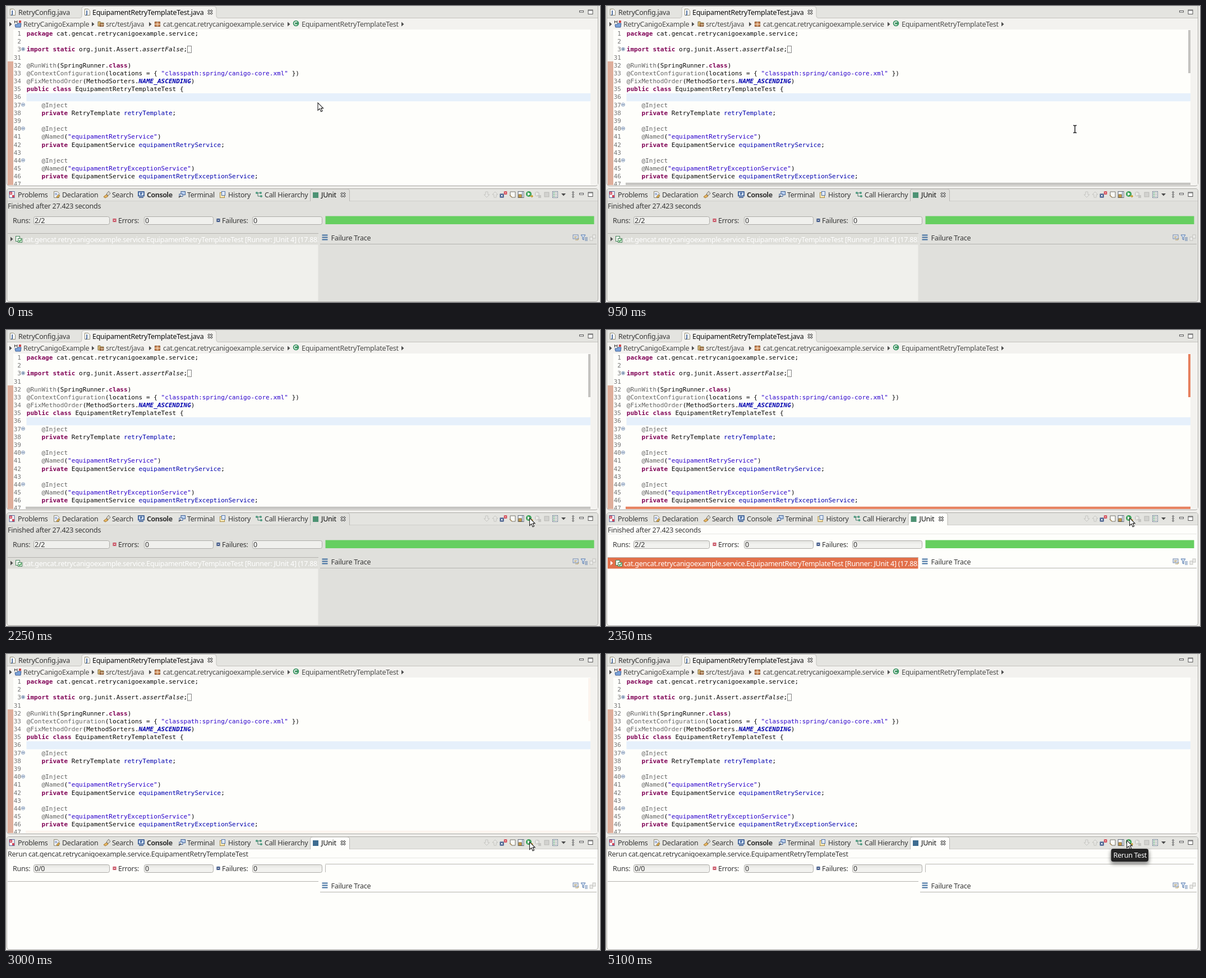
An HTML page for the animation above (8000 ms loop, 1059 by 529 pixels).

```html
<!DOCTYPE html>
<html lang="en">
<head>
<meta charset="utf-8">
<title>Test rerun</title>
<style>
  html, body { margin: 0; width: 100%; height: 100%; overflow: hidden; background: #f0efec; }
  svg { display: block; }
  text { white-space: pre; }
  .ui { font: 12.5px "Noto Sans", "Open Sans", sans-serif; letter-spacing: -.27px; fill: #383838; }
  .mono { font: 11.07px "DejaVu Sans Mono", monospace; fill: #080808; }
  .k { fill: #7f0055; font-weight: bold; }
  .a { fill: #646464; }
  .s { fill: #2a00cc; }
  .f { fill: #0000b0; }
  .i { font-style: italic; }
  .c { fill: #0000b0; font-weight: bold; font-style: italic; }
</style>
</head>
<body>
<svg id="stage" width="1059" height="529" viewBox="0 0 1059 529">
  <defs>
    <clipPath id="editClip"><rect x="2" y="42" width="1053" height="278"/></clipPath>
    <clipPath id="treeClip"><rect x="3" y="400" width="553.5" height="127"/></clipPath>
    <linearGradient id="field" x2="0" y2="1">
      <stop offset="0" stop-color="#e4e4e1"/><stop offset=".5" stop-color="#f2f2ef"/>
    </linearGradient>
    <filter id="blur" x="-20%" y="-50%" width="140%" height="200%"><feGaussianBlur stdDeviation="3.5"/></filter>
  </defs>
</svg>
<script>
const NS = 'http://www.w3.org/2000/svg';
const stage = document.getElementById('stage');

function add(parent, tag, attrs, content) {
  const el = document.createElementNS(NS, tag);
  for (const key in attrs) el.setAttribute(key, attrs[key]);
  if (content !== undefined) el.textContent = content;
  return parent.appendChild(el);
}
const group = (parent, attrs = {}) => add(parent, 'g', attrs);
const rect = (p, x, y, width, height, fill, more) => add(p, 'rect', { x, y, width, height, fill, ...more });
const path = (p, d, fill, stroke = 'none', more) => add(p, 'path', { d, fill, stroke, ...more });
const label = (p, x, y, str, more) => add(p, 'text', { x, y, class: 'ui', ...more }, str);
const at = (p, x, y) => group(p, { transform: `translate(${x} ${y})` });
const show = (el, on) => el.setAttribute('display', on ? 'inline' : 'none');

// Small icons, drawn around their own centre
const icons = {
  page(g, tint = '#fff') {
    path(g, 'M-4.5 -5.5h6l3 3v8h-9z', tint, '#8f8a72');
  },
  java(g) {
    icons.page(g);
    add(g, 'text', { x: -2.5, y: 3.5, 'font-family': 'DejaVu Sans, sans-serif', 'font-size': 9, 'font-weight': 'bold', fill: '#35598f' }, 'J');
  },
  close(g) {
    path(g, 'M-3.5 -3.5l7 7m0 -7l-7 7', 'none', '#4a4a4a', { 'stroke-width': 3.8 });
    path(g, 'M-3 -3l6 6m0 -6l-6 6', 'none', '#f4f4f2', { 'stroke-width': 1.4 });
  },
  project(g) {
    path(g, 'M-5 1h4l1 -2h6l-1 7h-9z', '#7aa2d8', '#3f5f94');
    path(g, 'M-5.5 -1v-4.5l2.2 2.5l2.2 -2.5v4.5', 'none', '#333');
    rect(g, 2, -6, 4, 4, '#d0454a');
  },
  folder(g) {
    path(g, 'M-5 4v-8h4l1 2h5v6z', '#d9b872', '#7d6a42');
    rect(g, -2, -1, 7, 6, '#8c5a38');
    path(g, 'M-1 1.5h6m-3 -2v5', 'none', '#f3dfbc');
  },
  pack(g) {
    rect(g, -4.5, -3.5, 9, 8, '#c8885a', { stroke: '#86502c' });
    path(g, 'M-5 .5h10m-5 -4v8M-3 -4v-2m6 2v-2', 'none', '#fae3c2');
  },
  klass(g) {
    add(g, 'circle', { r: 5.3, fill: '#3c9462' });
    path(g, 'M2 -1.8a2.7 2.7 0 1 0 0 3.6', 'none', '#fff', { 'stroke-width': 1.4 });
  },
  problems(g) {
    rect(g, -5, -5.5, 9, 11, '#f5f2f4', { stroke: '#55679b' });
    rect(g, -5, -5, 5, 5, '#c9344a');
    path(g, 'M-4 -4l3 3m0 -3l-3 3M1 -3h2M-3 3h6', 'none', '#fff');
    rect(g, 0, 1, 4, 4, '#d1475a');
  },
  decl(g) {
    icons.page(g, '#eef0f7');
    path(g, 'M-3 -2h4m-4 2h5', 'none', '#6b87b8');
    path(g, 'M0 4l4 -4l2 2l-4 4z', '#e2b355', '#8a6a2b');
  },
  search(g) {
    path(g, 'M-6 4l5 -4l3 3l-5 3z', '#e9b963', '#9f7230');
    path(g, 'M-1 -1l4 -5l3 4l-4 4z', '#d9d6cb', '#777');
  },
  console(g) {
    rect(g, -5, -5, 10, 7.5, '#d8e7fb', { stroke: '#284f8c', 'stroke-width': 1.6 });
    path(g, 'M-4 5h8M-2 -2.5h4m-4 2h3', 'none', '#284f8c', { 'stroke-width': 1.4 });
  },
  terminal(g) {
    rect(g, -2, -5.5, 7.5, 6, '#bcd2f0', { stroke: '#3e5f94' });
    rect(g, -5, -1, 6, 4.5, '#e7eef8', { stroke: '#3e5f94' });
    path(g, 'M-6 5l4 -3', 'none', '#555', { 'stroke-width': 2 });
  },
  history(g) {
    rect(g, -4.5, -3.5, 8, 9, '#f4e6b7', { stroke: '#ad8b3d' });
    rect(g, -1.5, -5.5, 6, 7, '#dfe9f8', { stroke: '#5576aa' });
  },
  calls(g) {
    path(g, 'M-5 -3h7M-2 -3v6h6', 'none', '#476');
    for (const [x, y] of [[-4, -3], [3, -3], [4, 3]]) add(g, 'circle', { cx: x, cy: y, r: 2.1, fill: '#4f9b80' });
  },
  block(g, color) { rect(g, -5, -5, 10, 10, color); },
  cross(g, color) {
    rect(g, -3, -3, 6, 6, color);
    path(g, 'M-1.6 -1.6l3.2 3.2m0 -3.2l-3.2 3.2', 'none', '#fff');
  },
  suite(g) {
    rect(g, -5.5, -5.5, 7, 9, '#f6f8f4', { stroke: '#47855c' });
    rect(g, -1.5, -1.5, 7, 7, '#e9f4e4', { stroke: '#47855c' });
    path(g, 'M0 2l1.5 2l3 -4', 'none', '#2f9a48', { 'stroke-width': 1.3 });
  },
  down(g) { path(g, 'M-2 -5h4v5h3l-5 5l-5 -5h3z', '#e6e6e3', '#c4c4c0'); },
  up(g) { path(g, 'M-2 5h4v-5h3l-5 -5l-5 5h3z', '#e6e6e3', '#c4c4c0'); },
  failures(g) {
    icons.cross(add(g, 'g', { transform: 'translate(-3 2) scale(1.15)' }), '#27447c');
    icons.cross(add(g, 'g', { transform: 'translate(3.5 -3) scale(.9)' }), '#cf2f3d');
  },
  stack(g) {
    path(g, 'M-4 -5h9v10h-6l-3 -3z', '#f9f9f5', '#77756c');
    path(g, 'M-5 1l4 4', 'none', '#a58a5a', { 'stroke-width': 1.6 });
  },
  lock(g) {
    rect(g, -5, -5.5, 10, 11, '#f1f3f6', { stroke: '#606b78' });
    rect(g, -4, 0, 5, 5, '#d2a44c', { stroke: '#7c6230' });
    path(g, 'M2.5 -5v10', 'none', '#7086a8');
  },
  rerun(g) {
    add(g, 'circle', { cx: -1, cy: -1, r: 5, fill: '#3ba257' });
    path(g, 'M-3 -4l5 3l-5 3z', '#fff');
    path(g, 'M1 3h5m-2 -2l2 2l-2 2', 'none', '#c49a2d', { 'stroke-width': 1.5 });
  },
  rerunOff(g) {
    add(g, 'circle', { cx: -1, cy: -1, r: 4.6, fill: '#d0d0cd' });
    path(g, 'M-3 -4l5 3l-5 3z', '#f0f0ee');
    rect(g, 1, 1, 5, 5, '#c6c6c2');
  },
  stop(g) { rect(g, -4, -4, 8, 8, '#d2d2cf', { stroke: '#b9b9b5' }); },
  list(g) {
    rect(g, -4.5, -5.5, 9, 11, '#fafaf7', { stroke: '#7b8c9c' });
    path(g, 'M-3 -3h2m-2 3h2m-2 3h2', 'none', '#368a5a', { 'stroke-width': 1.6 });
    path(g, 'M0 -3h3m-3 3h3m-3 3h3', 'none', '#777');
  },
  menu(g) { path(g, 'M-4 -2h8l-4 4.5z', '#4c4c4c'); },
  dots(g) { for (const y of [-4, 0, 4]) add(g, 'circle', { cy: y, r: 1.3, fill: '#fff', stroke: '#555' }); },
  min(g) { rect(g, -3.5, -2.5, 7, 2.6, '#fff', { stroke: '#555' }); },
  max(g) {
    rect(g, -4, -4, 8, 7.5, '#fff', { stroke: '#555' });
    path(g, 'M-4 -3h8', 'none', '#555');
  },
  arrow(g, color = '#4f4f4f') { path(g, 'M-2 -4l4.5 4l-4.5 4z', color); },
  trace(g) { path(g, 'M-5 -4h10M-5 0h10M-5 4h10', 'none', '#3d6c9f', { 'stroke-width': 2 }); },
  view(g) {
    rect(g, -5, -5, 9, 7, '#e2eaf5', { stroke: '#7388aa' });
    path(g, 'M-3 -2h5m-5 2h4M-1 4h5l1 -3', 'none', '#b89a58');
  },
  filter(g) {
    path(g, 'M-6 -5h8l-3 4v5l-2 -1v-4z', '#dbe8f8', '#5277ab');
    path(g, 'M1 0h5m-5 2.5h5m-5 2.5h5', 'none', '#5277ab');
  },
  compare(g) {
    rect(g, -5, -1, 5, 6, '#ececea', { stroke: '#c2c2be' });
    rect(g, 0, -5, 5, 6, '#ececea', { stroke: '#c2c2be' });
  }
};
const icon = (p, name, x, y, arg) => { const g = at(p, x, y); icons[name](g, arg); return g; };

// Editor panel
const LINE = '#aeada9', BAR = '#e4e4e0', PAPER = '#fefefb', DIM = '#e0e0dc';
rect(stage, 0, 0, 1059, 529, '#f0efec');
path(stage, 'M1.5 0V316Q1.5 321.5 7 321.5H1050Q1055.5 321.5 1055.5 316V0', '#f3f2ef', LINE);
rect(stage, 2, 0, 1053, 21, BAR);
path(stage, 'M2 21.5H132Q135 21 135 17V4Q136 .5 140 .5H371Q375 1 375 5V17Q375 21.5 379 21.5H1055V42H2z', '#f3f2ef');
path(stage, 'M2 21.5H132Q135 21 135 17V4Q136 .5 140 .5H371Q375 1 375 5V17Q375 21.5 379 21.5H1055', 'none', '#c4c3bf');
icon(stage, 'java', 12, 11);
label(stage, 22, 16, 'RetryConfig.java');
icon(stage, 'java', 145, 11);
label(stage, 154, 16, 'EquipamentRetryTemplateTest.java', { style: 'fill:#0c0c0c' });
icon(stage, 'close', 364, 11);
icon(stage, 'min', 1026, 11);
icon(stage, 'max', 1042, 11);

for (const x of [8, 155, 257, 504, 707]) icon(stage, 'arrow', x, 32.5);
const crumbs = [['project', 21, 31, 'RetryCanigoExample'], ['folder', 169, 178, 'src/test/java'],
  ['pack', 270, 280, 'cat.gencat.retrycanigoexample.service'], ['klass', 517, 527, 'EquipamentRetryTemplateTest']];
for (const [name, ix, tx, str] of crumbs) {
  icon(stage, name, ix, name === 'klass' ? 31 : 32);
  label(stage, tx, 37, str, { style: 'fill:#4c4c4a' });
}

const editor = group(stage, { 'clip-path': 'url(#editClip)' });
rect(editor, 3, 42, 1039, 279, PAPER);
rect(editor, 3, 42, 10, 57, '#f4f3ef');
rect(editor, 3, 99, 10, 222, '#deae9b');
rect(editor, 1042, 42, 13, 279, '#f4f3f0');
rect(editor, 36.5, 156, 1005.5, 14.3, '#e6f0fb');

// A token is style|text; tokens are separated by ~
const code = [
  [1, 'k|package~| cat.gencat.retrycanigoexample.service;'], [2, ''],
  [3, 'k|import static~| org.junit.Assert.~i|assertFalse~|;', '+'], [31, ''],
  [32, 'a|@RunWith~|(SpringRunner.~k|class~|)'],
  [33, 'a|@ContextConfiguration~|(locations = { ~s|"classpath:spring/canigo-core.xml"~| })'],
  [34, 'a|@FixMethodOrder~|(MethodSorters.~c|NAME_ASCENDING~|)'],
  [35, 'k|public class~| EquipamentRetryTemplateTest {'], [36, ''],
  [37, 'a|    @Inject', '-'],
  [38, 'k|    private~| RetryTemplate ~f|retryTemplate~|;'], [39, ''],
  [40, 'a|    @Inject', '-'], [41, 'a|    @Named~|(~s|"equipamentRetryService"~|)'],
  [42, 'k|    private~| EquipamentService ~f|equipamentRetryService~|;'], [43, ''],
  [44, 'a|    @Inject', '-'], [45, 'a|    @Named~|(~s|"equipamentRetryExceptionService"~|)'],
  [46, 'k|    private~| EquipamentService ~f|equipamentRetryExceptionService~|;'], [47, '']
];
code.forEach(([num, src, fold], row) => {
  const y = 53 + row * 14.18;
  add(editor, 'text', { x: 27, y, class: 'mono', 'text-anchor': 'end', style: 'fill:#757575' }, num);
  const line = add(editor, 'text', { x: 36.8, y, class: 'mono' });
  if (src) for (const token of src.split('~')) {
    const [style, str] = token.split('|');
    add(line, 'tspan', style ? { class: style } : {}, str);
  }
  if (fold) {
    const g = at(editor, 30.5, y - 4.3);
    add(g, 'circle', { r: 3, fill: '#eef3fa', stroke: '#7c94b4', 'stroke-width': .9 });
    path(g, fold === '+' ? 'M-2 0h4m-2 -2v4' : 'M-2 0h4', 'none', '#3e5d88');
  }
});
rect(editor, 323.5, 71.5, 7, 12, 'none', { stroke: '#777', 'stroke-width': .9 });
path(editor, 'M325 81.5h4', 'none', '#aaa', { 'stroke-dasharray': '1 1' });
const bars = group(editor);
rect(bars, 1038, 43, 4, 77);
rect(bars, 35, 315.7, 1007, 4.3);

// Lower panel
const panel = path(stage, 'M1.5 331Q1.5 326.5 6 326.5H1051Q1055.5 326.5 1055.5 331V523Q1055.5 528.5 1050 528.5H7Q1.5 528.5 1.5 523z', PAPER, LINE);
path(stage, 'M2 348V331Q2 327 6 327H1051Q1055 327 1055 331V348z', BAR);
path(stage, 'M2 348.5H1055', 'none', '#cfcecb');
[['problems', 11, 'Problems', 21], ['decl', 90, 'Declaration', 100], ['search', 180, 'Search', 189], ['console', 241]]
  .forEach(([name, x, str, tx]) => { icon(stage, name, x, 337); if (str) label(stage, tx, 342, str); });
const consoleTab = label(stage, 251, 342, 'Console');
const tabs = group(stage);
[['terminal', 314, 'Terminal', 323], ['history', 386, 'History', 396], ['calls', 451, 'Call Hierarchy', 461]]
  .forEach(([name, x, str, tx]) => { icon(tabs, name, x, 337); label(tabs, tx, 342, str); });
const active = path(tabs, 'M542.5 349V331Q542.5 327 547 327H608Q612.5 327 612.5 331V349', PAPER, '#b9b8b4');
const unitIcon = icon(tabs, 'block', 552, 338, '#4d9273').firstChild;
label(tabs, 562, 342, 'JUnit', { style: 'fill:#0c0c0c' });
icon(tabs, 'close', 601, 337.5);

['down', 'up', 'failures', 'stack', 'lock', 'rerun', 'rerunOff', 'stop', 'list', 'menu', 'dots', 'min', 'max']
  .forEach((name, i) => icon(stage, name, [857, 872, 887, 903, 918, 933, 948, 964, 979, 994, 1011, 1026, 1042][i], 337));

const status = label(stage, 3, 361.5, '');
const rule = path(stage, 'M3 364.5H1053', 'none', '#e7e7e4');
label(stage, 12, 388, 'Runs:');
icon(stage, 'cross', 193.5, 383, '#c44255');
label(stage, 200, 388, 'Errors:');
icon(stage, 'cross', 378.5, 383, '#2c477d');
label(stage, 385, 388, 'Failures:');
const fields = [[49, 136], [246, 124], [439, 125]].map(([x, w]) => {
  const box = rect(stage, x + .5, 376.5, w - 1, 14, PAPER, { rx: 3, stroke: '#adaca8' });
  return { box, value: label(stage, x + 2, 388, '0') };
});
const runs = fields[0].value;
const passed = rect(stage, 569.5, 375.5, 479, 14.5, '#66cf60');
const blank = path(stage, 'M569.5 390V376.5M569.5 375.5H1048', 'none', '#b8b7b3');

const tree = group(stage, { 'clip-path': 'url(#treeClip)' });
const treeBack = rect(tree, 3, 406, 554, 121, '#f0f0ec');
const item = group(tree);
const selection = rect(item, 3, 407, 554, 19.5, '#e2704a');
const expander = icon(item, 'arrow', 10, 416.5).firstChild;
icon(item, 'suite', 23, 417);
label(item, 31.5, 421.5, 'cat.gencat.retrycanigoexample.service.EquipamentRetryTemplateTest [Runner: JUnit 4] (17.883 s)', { style: 'fill:#fff' });
path(stage, 'M3 406.5H557M560 425.5H1053', 'none', '#b4b3af');
icon(stage, 'trace', 568.5, 413.5);
label(stage, 579.5, 419, 'Failure Trace');
icon(stage, 'view', 1016, 414);
icon(stage, 'filter', 1031, 414);
icon(stage, 'compare', 1046, 414);

const tip = group(stage);
rect(tip, 900, 351, 68, 24, '#000', { rx: 4, opacity: .5, filter: 'url(#blur)' });
rect(tip, 900.5, 348, 66.5, 23, '#242424', { rx: 4 });
label(tip, 904.5, 364, 'Rerun Test', { style: 'fill:#fff' });

const pointer = group(stage);
path(pointer, 'M0 0V13.5L3.3 10.4L5.6 15.7L8 14.7L5.7 9.6H9.6z', '#fff', '#222', { 'stroke-width': 1.1 });
const beam = group(stage);
const beamShape = 'M-3 -6.5H-1L0 -5.5L1 -6.5H3M0 -5.5V5.5M-3 6.5H-1L0 5.5L1 6.5H3';
path(beam, beamShape, 'none', '#fff', { 'stroke-width': 3.4 });
path(beam, beamShape, 'none', '#222', { 'stroke-width': 1.5 });

// Pointer stops: time, x, y
const route = [[0, 556, 173], [700, 556, 173], [750, 600, 180], [950, 836, 220], [1200, 912, 275],
  [1400, 930, 322], [1500, 928, 328]];
const rests = [[1600, 930, 333], [1800, 933.5, 336], [3650, 929, 335], [3850, 930.5, 334],
  [4300, 929, 333], [4600, 925, 334], [5100, 928.5, 333]];

function pointerAt(t) {
  const rest = rests.filter(r => r[0] <= t).pop();
  if (rest) return rest.slice(1);
  const n = route.findIndex(r => r[0] > t);
  if (n < 0) return route[route.length - 1].slice(1);
  const [a, b] = [route[n - 1], route[n]];
  const u = (t - a[0]) / (b[0] - a[0]);
  return [a[1] + (b[1] - a[1]) * u, a[2] + (b[2] - a[2]) * u];
}
const ramp = (t, from, to) => Math.min(1, Math.max(0, (t - from) / (to - from)));

function draw(now) {
  const t = Math.floor(now % 8000 / 50) * 50;
  const focused = t >= 2350, rerun = t >= 2600, bold = !focused || t >= 2800;
  const back = focused ? PAPER : DIM;

  panel.setAttribute('fill', back);
  active.setAttribute('fill', back);
  treeBack.setAttribute('fill', focused ? PAPER : '#f0f0ec');
  selection.setAttribute('fill', focused ? '#e2704a' : '#deded9');
  expander.setAttribute('fill', focused ? '#fff' : '#4f4f4f');
  for (const { box } of fields) box.setAttribute('fill', focused ? 'url(#field)' : '#f0f0ed');
  show(rule, focused);

  consoleTab.style.fontWeight = bold ? 'bold' : 'normal';
  consoleTab.style.letterSpacing = bold ? '-.5px' : '';
  tabs.setAttribute('transform', `translate(${bold ? 0 : -3.5} 0)`);
  unitIcon.setAttribute('fill', rerun ? '#3f6d91' : '#4d9273');

  status.textContent = rerun ? 'Rerun cat.gencat.retrycanigoexample.service.EquipamentRetryTemplateTest' : 'Finished after 27.423 seconds';
  runs.textContent = rerun ? '0/0' : '2/2';
  show(item, !rerun);
  show(passed, !rerun);
  show(blank, rerun);

  bars.setAttribute('fill', focused ? '#e6815f' : '#c4c3c0');
  const fade = t < 2500 ? 1 : t < 3000 ? 1 - .92 * ramp(t, 2500, 3000) : .08 * (1 - ramp(t, 3000, 3350));
  bars.setAttribute('opacity', focused ? fade : ramp(t, 500, 750));
  tip.setAttribute('opacity', ramp(t, 3150, 3350));

  const [x, y] = pointerAt(t);
  const inText = t >= 50 && y < 320;
  show(beam, inText);
  show(pointer, !inText);
  (inText ? beam : pointer).setAttribute('transform', `translate(${x} ${y})`);
}

let start;
function loop(now) {
  if (start === undefined) start = now;
  draw(now - start);
  requestAnimationFrame(loop);
}
draw(0);
requestAnimationFrame(loop);
</script>
</body>
</html>
```
